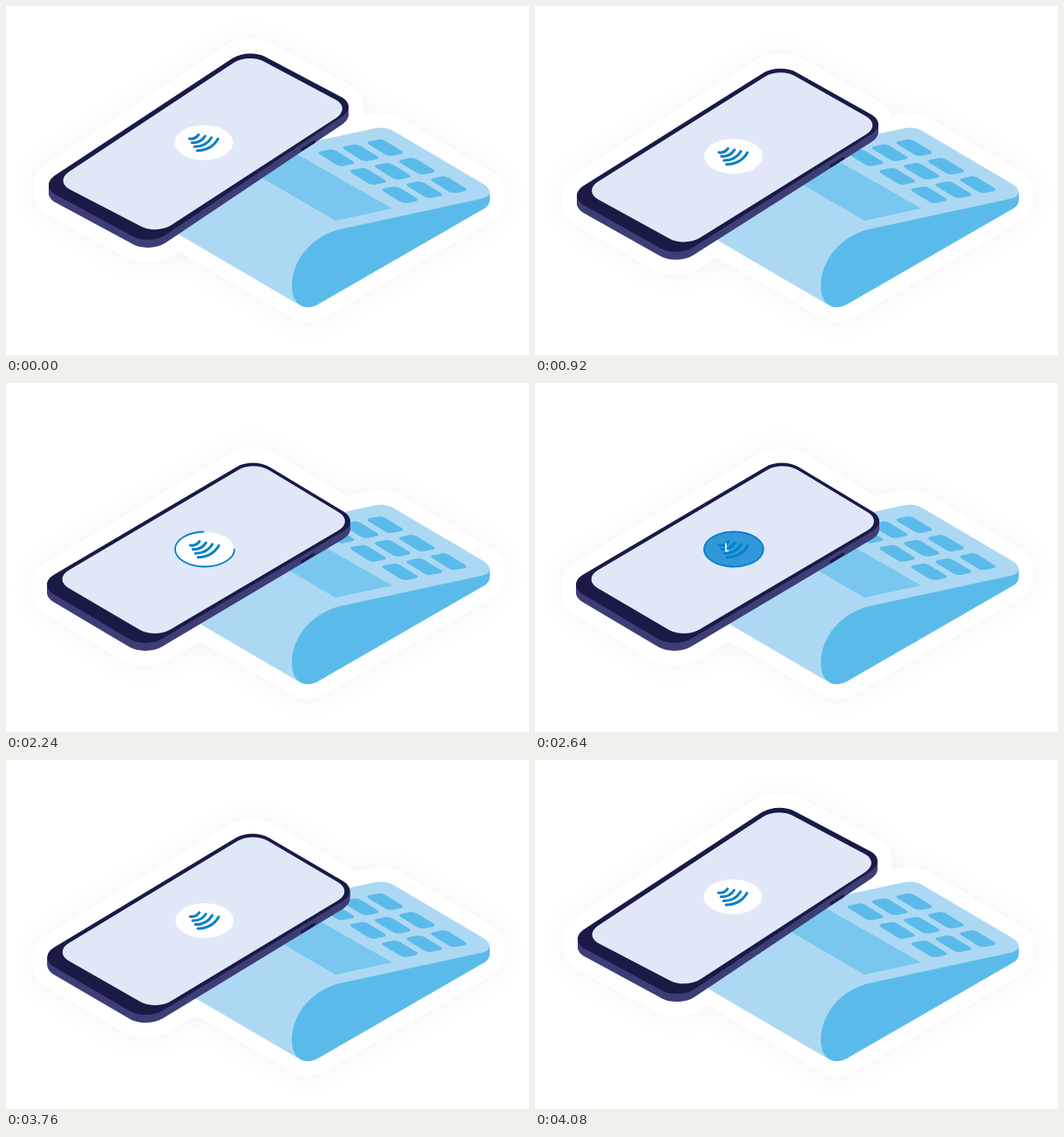
Write an HTML page with a canvas that moves like this. It is 600 px wide and 400 px high and loops after 4100 ms.

```html
<!DOCTYPE html>
<html>
<head>
<meta charset="utf-8">
<style>
html, body { margin: 0; width: 600px; height: 400px; overflow: hidden; background: #fff; }
canvas { display: block; }
</style>
</head>
<body>
<canvas id="stage" width="600" height="400"></canvas>
<script>
const ctx = document.getElementById('stage').getContext('2d');
const LOOP = 4100, DEPTH = 9, CASE_R = 22, GLASS_R = 20;
const NAVY = '#1a1a47', EDGE = '#3e3e77', GLASS = '#e0e7f6';
const PALE = '#add8f3', SKY = '#5abbeb', DISPLAY = '#79c7ef', BLUE = '#0080cf';

// Corner points: left, top, right, bottom
const CASE_UP = [[38, 206], [278, 48], [404, 114.5], [165, 274.5]];
const CASE_DOWN = [[36, 231], [283.5, 85], [406, 158.5], [160, 304.5]];
const GLASS_UP = [[55.5, 201], [278, 54], [396, 117], [173, 262]];
const GLASS_DOWN = [[54.5, 225], [284, 89.3], [399, 158.5], [171, 293]];
const KEY = [[-23, -6.3], [-4, -10.3], [23, 6.3], [4, 10.3]];

const clamp = v => Math.min(1, Math.max(0, v));
const ramp = (t, a, b) => clamp((t - a) / (b - a));
const ease = x => x < .5 ? 4 * x ** 3 : 1 - 4 * (1 - x) ** 3;
const mix = (a, b, k) => a + (b - a) * k;
const mixPoints = (a, b, k) => a.map((p, i) => p.map((v, j) => mix(v, b[i][j], k)));

function toward(a, b, d) {
  const k = d / Math.hypot(b[0] - a[0], b[1] - a[1]);
  return [mix(a[0], b[0], k), mix(a[1], b[1], k)];
}

// Polygon whose corners are quarter circles seen in projection
function rounded(pts, d, dy = 0) {
  const path = new Path2D(), n = pts.length;
  const at = p => [p[0], p[1] + dy];
  pts.forEach((c, i) => {
    const prev = pts[(i + n - 1) % n], next = pts[(i + 1) % n];
    path.lineTo(...at(toward(c, prev, d)));
    path.bezierCurveTo(...at(toward(c, prev, d * .45)), ...at(toward(c, next, d * .45)),
      ...at(toward(c, next, d)));
  });
  path.closePath();
  return path;
}

const body = new Path2D('M555 222V214Q555 208 546 203L444 143Q436 138 424 140L345 157L300 166L200 235L195 260L334 341.3L400 300Z');
const side = new Path2D('M555 213C555 218 550 220 545 221L385 255.5C355 261.5 328 288 328 321C328 341 340 350 357 342.5L548 232.5Q555 229 555 222Z');
const display = new Path2D('M443 232L378 246L280 189L320 162Z');

function fill(path, color) {
  ctx.fillStyle = color;
  ctx.fill(path);
}

function stroke(path, color, width) {
  ctx.strokeStyle = color;
  ctx.lineWidth = width;
  ctx.stroke(path);
}

function drawSticker(phone, base) {
  const outline = new Path2D();
  [phone, base, body, side].forEach(p => outline.addPath(p));
  ctx.save();
  ctx.lineJoin = 'round';
  ctx.shadowColor = 'rgba(0,0,0,.055)';
  ctx.shadowBlur = 32;
  stroke(outline, '#fff', 34);
  ctx.restore();
  fill(outline, '#fff');
}

function drawTerminal() {
  fill(body, PALE);
  fill(side, SKY);
  fill(display, DISPLAY);
  for (let row = 0; row < 3; row++) {
    for (let col = 0; col < 3; col++) {
      const x = 379 + 28 * col + 36.5 * row, y = 174 - 5.8 * col + 21.2 * row;
      fill(rounded(KEY.map(([a, b]) => [x + a, y + b]), 5), SKY);
    }
  }
}

function drawWaves(x, y) {
  const path = new Path2D();
  for (let k = 0; k < 4; k++) {
    path.moveTo(x - 16.5 + 2.9 * k, y - 4.5 + 4.6 * k);
    path.quadraticCurveTo(x - 10 + 6.3 * k, y - 3.5 + 4.1 * k, x - 6 + 7.4 * k, y - 9 + 1.6 * k);
  }
  stroke(path, '#0a80c8', 3);
}

function drawBadge(t, p) {
  const x = mix(227, 228, p), y = mix(156.5, 190.5, p);
  const oval = new Path2D();
  oval.ellipse(x, y, 33.5, 20, 0, 0, 2 * Math.PI);
  fill(oval, '#fff');
  drawWaves(x, y);

  const done = ramp(t, 2560, 2660) * (1 - ramp(t, 3380, 3560));
  if (t > 1240 && t < 2680) {
    const deg = Math.PI / 180, k = t - 1240;
    const start = 82 - .0814 * k, sweep = Math.min(360, .267 * k);
    const ring = new Path2D();
    ring.ellipse(x, y, 34, 20, 0, start * deg, (start + sweep) * deg);
    stroke(ring, BLUE, 1.8);
  }
  if (!done) return;

  ctx.save();
  ctx.globalAlpha = done;
  oval.ellipse(x, y, 34, 20.3, 0, 0, 2 * Math.PI);
  fill(oval, BLUE);
  const drawn = 32 * ramp(t, 2580, 2740);
  if (drawn) {
    const tick = new Path2D();
    tick.moveTo(x - 9, y - 7);
    tick.lineTo(x - 9, y - 7 + Math.min(9, drawn));
    if (drawn > 9) tick.lineTo(x - 18 + drawn, y + 1.7);
    ctx.lineCap = 'butt';
    ctx.lineJoin = 'miter';
    stroke(tick, '#fff', 2);
  }
  ctx.restore();
}

function draw(t) {
  const p = ease(ramp(t, 570, 1290)) - ease(ramp(t, 3538, 4150));
  const corners = mixPoints(CASE_UP, CASE_DOWN, p);
  const face = rounded(corners, CASE_R);

  ctx.clearRect(0, 0, 600, 400);
  ctx.lineCap = 'round';
  drawSticker(face, rounded(corners, CASE_R, DEPTH));
  drawTerminal();
  for (let dy = DEPTH; dy > 0; dy--) fill(rounded(corners, CASE_R, dy), EDGE);
  fill(face, NAVY);
  fill(rounded(mixPoints(GLASS_UP, GLASS_DOWN, p), GLASS_R), GLASS);

  const button = new Path2D(), by = mix(164.5, 204.8, p);
  button.moveTo(339.5, by);
  button.lineTo(353.5, by - 8.7);
  stroke(button, NAVY, 3);
  drawBadge(t, p);
}

const begin = performance.now();
function tick() {
  draw((performance.now() - begin) % LOOP);
  requestAnimationFrame(tick);
}
tick();
</script>
</body>
</html>
```
